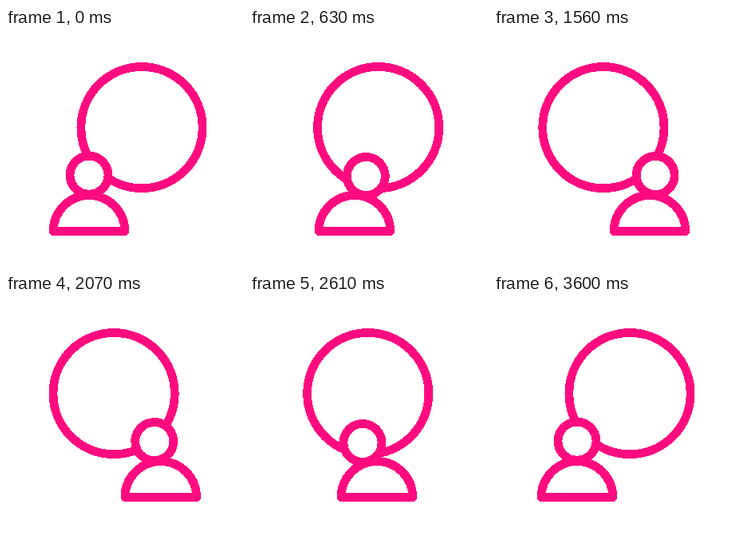
An HTML page for the animation above (3630 ms loop, 298 by 298 pixels).

```html
<!DOCTYPE html>
<html lang="en">
<head>
<meta charset="utf-8">
<title>Person and circle</title>
<style>
  html, body { margin: 0; width: 100%; height: 100%; overflow: hidden; background: #fff; }
  svg { display: block; width: 100vw; height: 100vh; }
</style>
</head>
<body>
<svg viewBox="0 0 298 298" fill="#fff" stroke="#ff0b80" stroke-width="10.8"
     stroke-linejoin="round" shape-rendering="crispEdges">
  <circle id="bubble" cy="124.6" r="76.1"/>
  <g id="person">
    <path d="M-44.8 254.5a44.8 45 0 0 1 89.6 0z"/>
    <circle id="head" cy="184.1" r="24"/>
  </g>
</svg>
<script>
  const LOOP = 3630, STEP = 30, PIVOT_Y = 254.5;
  const [bubble, person, head] = ['bubble', 'person', 'head'].map(id => document.getElementById(id));

  // Keys are [time, value] pairs, eased in and out between neighbours.
  const tracks = {
    bubble: [[0, 170], [1890, 134], [3600, 170]],
    person: [[0, 104], [1800, 199.6], [3600, 104]],
    tilt: [[0, 0], [900, 15], [2700, -15], [3600, 0]]
  };

  function valueAt(keys, t) {
    const next = keys.findIndex(([time]) => time > t);
    if (next < 0) return keys[keys.length - 1][1];
    const [t0, v0] = keys[next - 1], [t1, v1] = keys[next];
    const u = (t - t0) / (t1 - t0);
    return v0 + (v1 - v0) * u * u * (3 - 2 * u);
  }

  function draw() {
    const t = Math.floor(performance.now() % LOOP / STEP) * STEP;
    bubble.setAttribute('cx', valueAt(tracks.bubble, t));
    person.setAttribute('transform', `translate(${valueAt(tracks.person, t)} 0)`);
    head.setAttribute('transform', `rotate(${valueAt(tracks.tilt, t)} 0 ${PIVOT_Y})`);
    requestAnimationFrame(draw);
  }
  draw();
</script>
</body>
</html>
```
